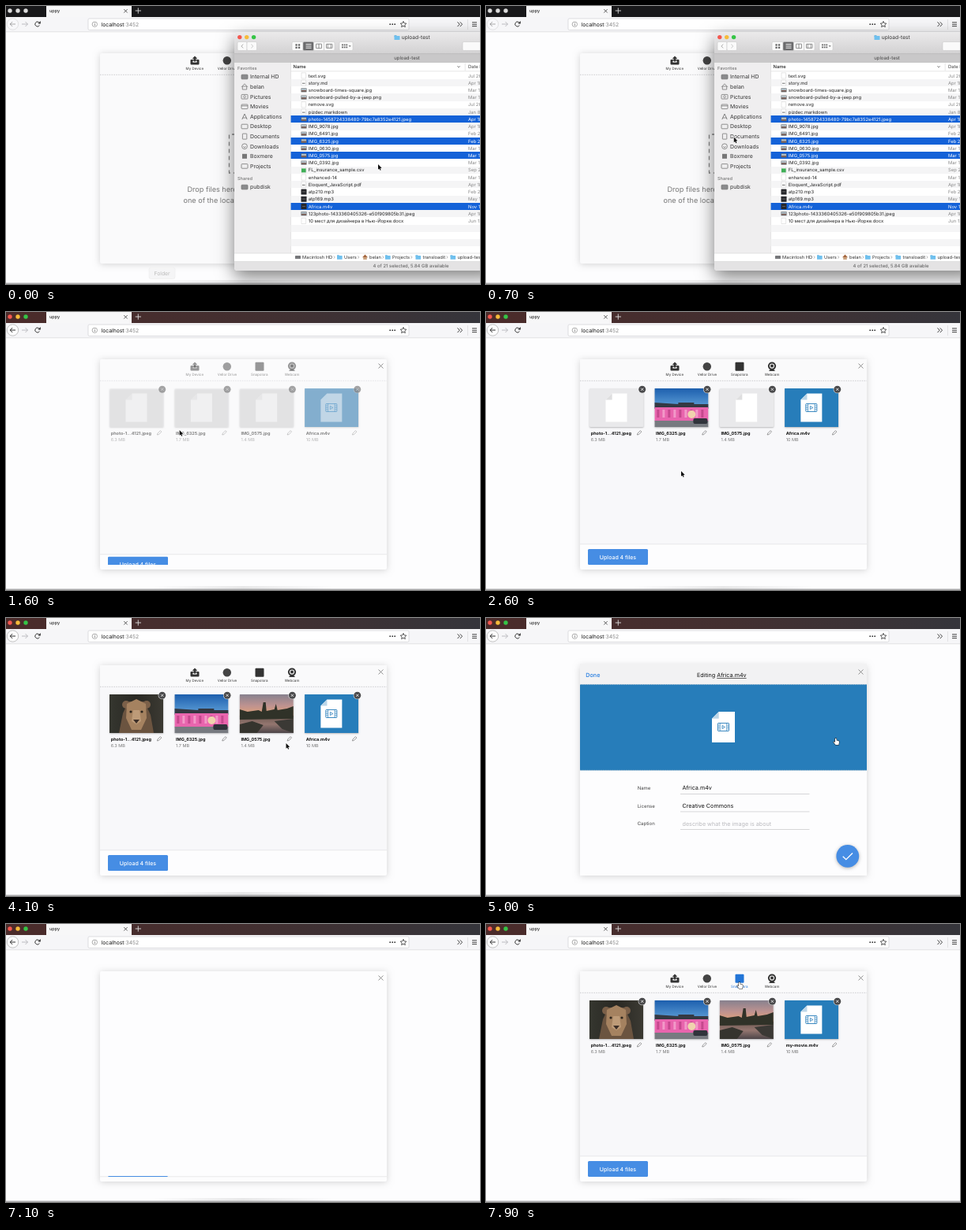
An HTML page with a canvas that plays this animation: 600x353 px, repeating every 8000 ms.

```html
<!DOCTYPE html>
<html lang="en">
<head>
<meta charset="utf-8">
<title>uppy</title>
<style>
html, body { margin: 0; width: 100%; height: 100%; overflow: hidden; background: #fdfdfe; }
canvas { display: block; width: 600px; height: 353px; }
</style>
</head>
<body>
<canvas id="stage"></canvas>
<script>
const W = 600, H = 353, LOOP = 8000, STEP = 100;
const BLUE = '#468de4', INK = '#222', TEAL = '#277dba';
const canvas = document.getElementById('stage');
const ratio = window.devicePixelRatio || 1;
canvas.width = W * ratio;
canvas.height = H * ratio;
const c = canvas.getContext('2d');
c.scale(ratio, ratio);
c.textRendering = 'geometricPrecision';

// Drawing helpers
function text(s, x, y, size, color = INK, weight = 400, align = 'left') {
  c.font = `${weight} ${size}px Inter, "Open Sans", sans-serif`;
  c.textAlign = align;
  c.textBaseline = 'alphabetic';
  c.fillStyle = color;
  c.fillText(s, x, y + size * 0.36);
  return c.measureText(s).width;
}
function rect(x, y, w, h, color) {
  c.fillStyle = color;
  c.fillRect(x, y, w, h);
}
function round(x, y, w, h, r, fill, stroke, lw = 0.6) {
  c.beginPath();
  c.roundRect(x, y, w, h, r);
  if (fill) { c.fillStyle = fill; c.fill(); }
  if (stroke) { c.strokeStyle = stroke; c.lineWidth = lw; c.stroke(); }
}
function disc(x, y, r, fill, stroke, lw = 0.8) {
  c.beginPath();
  c.arc(x, y, r, 0, 7);
  if (fill) { c.fillStyle = fill; c.fill(); }
  if (stroke) { c.strokeStyle = stroke; c.lineWidth = lw; c.stroke(); }
}
function path(pts, color, lw = 1, close) {
  c.beginPath();
  for (let i = 0; i < pts.length; i += 2) c.lineTo(pts[i], pts[i + 1]);
  if (close) c.closePath();
  c.strokeStyle = color;
  c.lineWidth = lw;
  c.stroke();
}
function poly(pts, fill) {
  c.beginPath();
  for (let i = 0; i < pts.length; i += 2) c.lineTo(pts[i], pts[i + 1]);
  c.closePath();
  c.fillStyle = fill;
  c.fill();
}
function cross(x, y, r, color, lw) {
  path([x - r, y - r, x + r, y + r], color, lw);
  path([x - r, y + r, x + r, y - r], color, lw);
}
function shade(x0, y0, x1, y1, ...colors) {
  const g = c.createLinearGradient(x0, y0, x1, y1);
  colors.forEach((col, i) => g.addColorStop(i / (colors.length - 1), col));
  return g;
}
function group(fn, { x = 0, y = 0, alpha = 1, clip, blur, shadow, drop = 1 } = {}) {
  c.save();
  if (clip) { c.beginPath(); c.rect(...clip); c.clip(); }
  c.translate(x, y);
  c.globalAlpha *= alpha;
  if (blur) { c.shadowBlur = blur * ratio; c.shadowColor = shadow; c.shadowOffsetY = drop * ratio; }
  fn();
  c.restore();
}
const clamp = v => Math.max(0, Math.min(1, v));
const ease = v => v * v * (3 - 2 * v);
const ramp = (t, a, b) => ease(clamp((t - a) / (b - a)));

// Browser
function browser(active) {
  rect(0, 0, W, H, '#fdfdfe');
  rect(0, 0, W, 14, active ? shade(0, 0, W, 0, '#4b2b2a', '#432f30', '#35353b') : '#18181a');
  const lights = active ? ['#f4574f', '#f6bb3a', '#35c546'] : ['#dcdcdc', '#dcdcdc', '#dcdcdc'];
  lights.forEach((col, i) => disc(5 + i * 10, 6, 2.7, col));
  rect(51, 0, 108, 14, '#f7f7f8');
  text('uppy', 55, 6.3, 5.6, '#111');
  cross(151.5, 6.3, 2.2, '#333', 0.8);
  path([163.7, 6, 171, 6], '#ddd', 0.9);
  path([167.3, 2.4, 167.3, 9.6], '#ddd', 0.9);

  rect(0, 14, W, 19, '#f6f6f8');
  rect(0, 32.5, W, 0.7, '#d9d9dc');
  group(() => {
    disc(8.5, 23, 7.2, '#fdfdfd', '#aaa', 0.7);
    path([12, 23, 5.2, 23], '#333', 1);
    path([8.2, 20, 5.2, 23, 8.2, 26], '#333', 1);
  }, { alpha: active ? 1 : 0.4 });
  path([20, 23, 27.5, 23], '#b5b5b8', 0.9);
  path([24.5, 20, 27.5, 23, 24.5, 26], '#b5b5b8', 0.9);
  c.beginPath();
  c.arc(39.8, 23, 3, 0.5, 5.5);
  c.strokeStyle = '#333'; c.lineWidth = 1; c.stroke();
  poly([43.8, 19, 43.8, 22.6, 40.3, 22.6], '#333');

  round(104, 16, 406, 14.5, 1.5, '#fff', '#c9c9cd');
  disc(112.3, 23.2, 3.2, null, '#777', 0.6);
  rect(112, 22.6, 0.7, 2.4, '#666');
  rect(112, 21.2, 0.7, 0.7, '#666');
  const w = text('localhost', 120.5, 23.2, 6.8, '#111');
  text(':3452', 120.5 + w, 23.2, 6.8, '#888');
  [486.2, 489.2, 492.2].forEach(x => disc(x, 23.2, 0.9, '#333'));
  const star = [];
  for (let i = 0; i < 10; i++) {
    const a = -Math.PI / 2 + i * Math.PI / 5, r = i % 2 ? 1.9 : 4;
    star.push(503 + r * Math.cos(a), 23.4 + r * Math.sin(a));
  }
  path(star, '#333', 0.8, true);
  [571.5, 574.8].forEach(x => path([x, 20.3, x + 2.7, 23.2, x, 26.1], '#333', 0.9));
  rect(584, 17, 0.6, 13, '#d5d5d8');
  [20.8, 23.2, 25.6].forEach(y => rect(590, y - 0.4, 6, 0.9, '#333'));

  rect(185, 348, 230, 4, shade(185, 0, 415, 0, '#0000', '#00000016', '#0000'));
  rect(0, 351.7, W, 0.9, '#77777a');
}

// Upload panel
function panel(fill) {
  group(() => round(119, 60, 363, 267, 2, fill), { blur: 9, shadow: 'rgba(0,0,0,.17)' });
}
function closeMark() { cross(474.5, 68.5, 3, '#777', 0.8); }

function sources(hover) {
  const label = (s, x, col = '#333') => text(s, x, 79.7, 4.5, col, 400, 'center');
  const dark = '#333';
  round(233.5, 68, 11, 6.6, 1, dark);
  rect(236.4, 69.4, 5.2, 2.2, '#f8f8f8');
  poly([239, 63.5, 242.3, 67, 240.2, 67, 240.2, 70.4, 237.8, 70.4, 237.8, 67, 235.7, 67], dark);
  label('My Device', 238.8);
  disc(279.8, 69.3, 5.2, '#444');
  label('Vellor Drive', 280);
  const pick = hover ? '#2275d7' : dark;
  round(315.5, 63.7, 11, 11, 1, pick);
  label('Snapolora', 320.8, pick);
  disc(362, 68.6, 5.1, dark);
  disc(362, 68.6, 3.1, '#f8f8f8');
  disc(362, 68.6, 2, dark);
  poly([358, 75, 360, 72.8, 364, 72.8, 366, 75], dark);
  label('Webcam', 362);
  c.setLineDash([1.6, 1.3]);
  path([119, 87.3, 482, 87.3], '#c4c4c7', 0.8);
  c.setLineDash([]);
}

function dropZone(over) {
  panel(over ? '#e3e3e5' : '#fafafb');
  sources(false);
  closeMark();
  const ink = over ? '#444' : '#777';
  c.setLineDash([5, 4]);
  path([318, 163, 282.5, 163, 282.5, 212, 318, 212], '#888', 1.3, true);
  c.setLineDash([]);
  text('Drop files here, paste or import', 229.5, 233.2, 9.1, ink);
  text('one of the locations above', 224.5, 246.3, 9.1, ink);
}

function sheet(x, y, w, h, film) {
  const f = w * 0.3;
  poly([x + f, y, x + w, y, x + w, y + h, x, y + h, x, y + f], '#fff');
  poly([x + f, y, x + f, y + f, x, y + f], film ? '#bcd6e8' : '#dededf');
  if (!film) return;
  const cx = x + w / 2, cy = y + h * 0.5;
  round(cx - 7, cy - 5, 14, 10, 0.6, null, TEAL, 0.9);
  path([cx - 4.3, cy - 5, cx - 4.3, cy + 5], TEAL, 0.7);
  path([cx + 4.3, cy - 5, cx + 4.3, cy + 5], TEAL, 0.7);
  for (const s of [-1, 1]) for (const d of [-2.4, 0, 2.4])
    path([cx + s * 4.3, cy + d, cx + s * 7, cy + d], TEAL, 0.6);
  path([cx - 1.5, cy - 2, cx + 2, cy, cx - 1.5, cy + 2], TEAL, 0.8, true);
}

// Simple stand-ins for the photos, each 68 by 49
const photos = [
  () => {
    rect(0, 0, 68, 49, shade(0, 0, 68, 0, '#35362f', '#292823', '#3c3a33'));
    poly([12, 49, 17, 24, 24, 9, 44, 9, 52, 26, 56, 49], '#6b5440');
    disc(21, 13, 5, '#7b6049');
    disc(47, 13, 5, '#7b6049');
    poly([22, 12, 34, 6, 46, 12, 47, 30, 40, 45, 28, 45, 21, 30], '#a58260');
    poly([30, 20, 38, 20, 40, 34, 34, 38, 28, 34], '#bd9b78');
    poly([30, 32, 38, 32, 34, 37], '#3d2f28');
    disc(27, 22, 1.6, '#2b241d');
    disc(41, 22, 1.6, '#2b241d');
  },
  () => {
    rect(0, 0, 68, 25, shade(0, 0, 0, 25, '#1d5fae', '#5fa0d8'));
    poly([0, 18, 30, 20, 30, 18, 50, 18, 50, 20, 68, 20, 68, 26, 0, 26], '#343842');
    rect(0, 24, 68, 18, '#e965ae');
    for (let i = 0; i < 9; i++) rect(3 + i * 7, 27, 3, 10, i % 2 ? '#f299c8' : '#c5488e');
    rect(0, 41, 68, 8, '#777a80');
    disc(47, 33, 5, '#f0d3ae');
    round(49, 38, 18, 7, 2, '#30333b');
  },
  () => {
    rect(0, 0, 68, 28, shade(0, 0, 0, 28, '#87818e', '#bd9290', '#e9a574'));
    rect(0, 27, 68, 22, shade(0, 27, 0, 49, '#6d5850', '#947670', '#4c4548'));
    poly([0, 19, 10, 22, 24, 20, 28, 22, 30, 10, 33, 10, 34, 21, 44, 19, 46, 12, 48, 20, 60, 18, 68, 15, 68, 31, 0, 32], '#303228');
    poly([0, 38, 16, 34, 30, 39, 22, 49, 0, 49], '#35342e');
    poly([44, 34, 68, 31, 68, 49, 54, 44], '#3b3935');
  },
  () => {
    rect(0, 0, 68, 49, TEAL);
    sheet(20.3, 6.5, 27, 36, true);
  }
];

function card(i, name, size, loaded) {
  const x = 131 + i * 82.35;
  group(() => round(x, 97, 68.5, 49, 1.5, '#e9e9eb'), { blur: 2, shadow: 'rgba(0,0,0,.25)' });
  if (loaded) group(photos[i], { x, y: 97, clip: [x, 97, 68.5, 49] });
  else sheet(x + 20.5, 103.5, 27, 36);
  disc(x + 66.7, 98.3, 5, '#fff');
  disc(x + 66.7, 98.3, 4.5, '#4a4a4c');
  cross(x + 66.7, 98.3, 1.6, '#fff', 0.8);
  text(name, x + 1.7, 154, 5.5, '#111', 700);
  text(size, x + 1.7, 162.2, 5.5, '#777');
  path([x + 60.4, 156, x + 61, 154, x + 64.4, 150.6, x + 65.9, 152.1, x + 62.4, 155.5], '#777', 0.7, true);
}

function files(t, start, movie, loaded) {
  const k = ramp(t, start, start + 400);
  const top = 320.5 - 26 * k;
  panel('#fdfdfe');
  group(() => {
    rect(119, 87, 363, top - 87, '#f8f8fa');
    rect(119, 60, 363, 27, '#fafafb');
    sources(t >= 7700);
    card(0, 'photo-1...4121.jpeg', '6.3 MB', loaded[0]);
    card(1, 'IMG_6325.jpg', '1.7 MB', loaded[1]);
    card(2, 'IMG_0575.jpg', '1.4 MB', loaded[2]);
    card(3, movie, '10 MB', true);
  }, { alpha: k });
  rect(119, top, 363, 0.7, '#dfdfe2');
  const bt = 320 - 19 * k;
  group(() => {
    round(129, 301, 76, 20, 1.5, BLUE);
    text('Upload 4 files', 167, 311.2, 7, '#fff', 500, 'center');
  }, { y: bt - 301, clip: [119, bt, 363, 321 - bt] });
  closeMark();
}

// File details
const typed = [5800, 6000, 6100, 6200, 6300, 6500, 6700, 6800];
function editor(t) {
  const k = ramp(t, 4700, 5000);
  const count = typed.filter(s => t >= s).length;
  const stem = t < 5700 ? 'Africa' : 'my-movie'.slice(0, count);
  group(() => {
    rect(119, 58, 363, 269, '#fdfdfe');
    rect(119, 58, 363, 26.5, '#f2f2f3');
    text('Done', 126.3, 72.4, 7.2, '#1f7ae0', 500);
    const a = text('Editing ', 267, 72.3, 7.2, '#111');
    const b = text('Africa.m4v', 267 + a, 72.3, 7.2, '#111');
    rect(267 + a, 76.2, b, 0.7, '#222');
    rect(119, 84.3, 363, 109.2, TEAL);
    c.setLineDash([1.6, 1.3]);
    path([119, 84.4, 482, 84.4], '#b9c6cf', 0.7);
    path([119, 193.4, 482, 193.4], '#b9c6cf', 0.7);
    c.setLineDash([]);
    sheet(286, 119, 29, 39, true);
    ['Name', 'License', 'Caption'].forEach((s, i) => {
      text(s, 191.7, 216 + i * 22.6, 6, '#444');
      rect(246, 223 + i * 22.6, 163.5, 0.7, '#c5c5c8');
    });
    c.font = '400 7.2px Inter, "Open Sans", sans-serif';
    const w = c.measureText(stem).width;
    if (t === 5600) rect(248.5, 211.5, w, 9.5, '#b3d7ff');
    text(stem + '.m4v', 248.5, 215.9, 7.2, '#111');
    if (t >= 5700) rect(248.7 + w, 211.8, 0.7, 8.6, '#222');
    text('Creative Commons', 248.5, 238.5, 7.2, '#111');
    text('describe what the image is about', 248.5, 261.2, 7.2, '#b9b9bd');
    group(() => disc(457.8, 302.4, 14.4, BLUE), { blur: 4, shadow: 'rgba(0,0,0,.3)' });
    path([451.7, 302.8, 455.8, 306.7, 464, 298.5], '#fff', 1.3);
  }, { y: -269 * (1 - k), clip: [119, 57.5, 363, 270] });
  closeMark();
}

// File window
const rows = `text.svg|Jul 26
story.md|Apr 18
snowboard-times-square.jpg|Mar 18
snowboard-pulled-by-a-jeep.png|Mar 18
remove.svg|Jul 26
pizdec.markdown|Jan 8,
photo-1458724338480-79bc7a8352e4121.jpeg|Apr 18
IMG_9078.jpg|Apr 18
IMG_6491.jpg|Feb 2
IMG_6325.jpg|Feb 2
IMG_0630.jpg|Mar 18
IMG_0575.jpg|Mar 18
IMG_0392.jpg|Mar 18
FL_insurance_sample.csv|Sep 2
enhanced-14|Mar 18
Eloquent_JavaScript.pdf|Apr 18
atp210.mp3|Feb 2
atp169.mp3|May 1
Africa.m4v|Nov 1
123photo-1433360405326-e50f909805b31.jpeg|Apr 18
10 мест для дизайнера в Нью-Йорке.docx|Jun 13`.split('\n').map(r => r.split('|'));
const picked = [6, 9, 11, 18];

function folder(x, y, s = 1) {
  rect(x, y - 2.8 * s, 3 * s, 2 * s, '#5aaee0');
  round(x, y - 2 * s, 7 * s, 5 * s, 0.5, '#6fc0ee');
}
function fileIcon(name, y) {
  if (/jp|png/.test(name)) {
    rect(373.5, y - 2.5, 7, 5, '#5d6468');
    rect(374, y - 2, 6, 2, '#b5c3cb');
    rect(374, y + 0.3, 6, 1.2, '#8d6458');
  } else if (/mp3|m4v/.test(name)) {
    round(373.5, y - 3.6, 7, 7.2, 0.6, '#26272b');
    rect(375, y - 0.5, 4, 0.7, '#777');
  } else {
    rect(374, y - 3.6, 5.6, 7.2, '#fff');
    path([374, y - 3.6, 379.6, y - 3.6, 379.6, y + 3.6, 374, y + 3.6], '#ccc', 0.5, true);
    if (/csv/.test(name)) rect(374, y - 2, 5.6, 5, '#3fae56');
    else if (/md|mark|pdf/.test(name)) rect(375, y, 3.6, 1.2, '#888');
  }
}

function fileWindow() {
  group(() => round(289, 33.5, 330, 302.5, 4, '#fff'),
    { blur: 22, shadow: 'rgba(0,0,0,.5)', drop: 8 });
  round(289, 33.5, 330, 38, [4, 0, 0, 0], shade(0, 33, 0, 61, '#ebeaeb', '#d2d1d2'));
  ['#f4574f', '#f6bb3a', '#35c546'].forEach((col, i) => disc(295.8 + i * 8.9, 39.6, 2.7, col));
  folder(491.5, 40);
  text('upload-test', 500.8, 39.8, 6.6, '#333');
  const button = (x, w, fill = '#fafafa') => round(x, 45.5, w, 11, 1.5, fill, '#c2c2c2', 0.5);
  button(293, 12); button(305, 12.5);
  path([300.3, 48.6, 297.8, 51, 300.3, 53.4], '#999', 0.8);
  path([310.3, 48.6, 312.8, 51, 310.3, 53.4], '#bbb', 0.8);
  button(362, 14); button(376, 13.5, '#6b6b6d'); button(389.5, 13); button(402.5, 13.5);
  for (const x of [366.4, 369.9]) for (const y of [48.3, 51.7]) rect(x, y, 2.3, 2.3, '#666');
  [48.2, 50.5, 52.8].forEach(y => rect(379.5, y, 7, 0.9, '#fff'));
  round(392.5, 48.2, 7, 5.5, 0.3, null, '#666', 0.7);
  path([396, 48.2, 396, 53.7], '#666', 0.7);
  round(405.5, 48.4, 7.5, 5, 0.3, null, '#666', 0.7);
  path([407.4, 48.4, 407.4, 53.4], '#666', 0.6);
  path([411.1, 48.4, 411.1, 53.4], '#666', 0.6);
  button(422, 17);
  for (const x of [425, 427.7, 430.4]) for (const y of [48.5, 51.5]) rect(x, y, 1.8, 1.8, '#666');
  poly([433.7, 50.2, 436.7, 50.2, 435.2, 52], '#666');
  button(578, 30);

  rect(289, 60.5, 311, 11, '#c9c8c9');
  rect(289, 60.5, 311, 0.6, '#b3b3b3');
  text('upload-test', 507.5, 66, 6, '#444', 400, 'center');
  rect(289, 71.5, 71, 242.5, '#efeeef');
  rect(360, 71.5, 0.6, 242.5, '#d2d2d2');
  rect(289, 71.3, 311, 0.6, '#bbb');

  text('Favorites', 293, 79, 5.6, '#777', 500);
  const places = ['Internal HD', 'belan', 'Pictures', 'Movies', 'Applications', 'Desktop',
    'Documents', 'Downloads', 'Boxmere', 'Projects', 'pubdisk'];
  places.forEach((s, i) => {
    const y = i < 10 ? 90 + i * 12.6 : 230;
    if (i === 1) {
      path([298, 102.8, 302, 98.8, 306, 102.8], '#777', 0.8);
      round(299.3, 102, 5.4, 4, 0, null, '#777', 0.8);
    } else if (i === 4) {
      path([298.8, 144, 302, 137, 305.2, 144], '#777', 0.9);
      path([299.5, 142, 304.7, 142], '#777', 0.8);
    } else if (i === 7) {
      disc(302, y, 3.4, null, '#777');
      path([300.4, y, 302, y + 1.8, 303.6, y], '#777', 0.8);
    } else if (i === 8) rect(299, y - 3, 6, 6, '#777');
    else if (i === 6) round(299.4, y - 3.5, 5.4, 7, 0.4, null, '#777', 0.8);
    else {
      round(298, y - 2.8, 8, 5.6, 0.8, i === 0 || i === 10 ? '#8a8a8c' : null, '#777', 0.8);
      if (i === 2) disc(302, y, 1.4, null, '#777', 0.7);
      if (i === 3) path([298, y - 1, 306, y - 1], '#777', 0.8);
    }
    text(s, 309, y, 6.9, '#333');
  });
  text('Shared', 293, 218.5, 5.6, '#777', 500);

  text('Name', 363.5, 77.2, 5.8, '#222', 500);
  path([571.3, 76.3, 573, 78, 574.7, 76.3], '#666', 0.8);
  rect(580.8, 72.5, 0.6, 9.5, '#d5d5d5');
  text('Date Modified', 585, 77.2, 5.8, '#444');
  rect(360.5, 82.6, 240, 0.6, '#d5d5d5');
  for (let i = 0; i < 25; i++) {
    const y = 88.4 + i * 9.225, on = picked.includes(i);
    if (on || i % 2) {
      const top = Math.round(y - 4.6);
      rect(360.6, top, 240, Math.round(y + 4.6) - top, on ? '#1462d8' : '#f5f5f6');
    }
    if (!rows[i]) continue;
    const [name, date] = rows[i];
    fileIcon(name, y);
    text(name, 382.8, y, 5.85, on ? '#fff' : '#222');
    text(date, 585, y, 5.85, on ? '#fff' : '#888');
  }

  rect(289, 314, 311, 10, '#fff');
  rect(289, 313.7, 311, 0.6, '#d5d5d5');
  const trail = [['Macintosh HD', 366], ['Users', 419], ['belan', 451], ['Projects', 480],
    ['transloadit', 518.5], ['upload-test', 562.5]];
  trail.forEach(([s, x], i) => {
    if (i === 0) round(x, 317, 7, 4, 0.6, '#77787b');
    else if (i === 2) {
      poly([x, 319.3, x + 3.5, 315.6, x + 7, 319.3], '#a5673f');
      rect(x + 1.2, 319, 4.6, 3, '#caa27e');
    } else folder(x, 319, 0.95);
    const w = text(s, x + 9, 319, 5.75, '#333');
    if (i < 5) path([x + w + 10.6, 317.3, x + w + 12, 319, x + w + 10.6, 320.7], '#888', 0.6);
  });
  rect(289, 324, 311, 0.6, '#c5c5c5');
  round(289, 324.4, 330, 11.6, [0, 0, 0, 4], '#e4e3e4');
  text('4 of 21 selected, 5.84 GB available', 512.5, 330.2, 5.9, '#555', 400, 'center');
}

// Pointer: time, x, y
const track = [[0, 471, 201], [300, 410, 187], [1100, 217.5, 146], [1500, 218, 147], [2200, 247, 202],
  [3400, 247, 202], [3700, 302, 178], [3900, 310, 174], [4100, 354.5, 159], [4600, 441, 150],
  [5000, 442, 153], [5500, 268, 213], [7200, 296, 170], [7700, 320, 74], [8000, 320, 74]];

function pointer(t) {
  if (t >= 5700 && t < 7300) return;
  let i = 0;
  while (t >= track[i + 1][0]) i++;
  const [t0, x0, y0] = track[i], [t1, x1, y1] = track[i + 1];
  const k = ease((t - t0) / (t1 - t0));
  const x = x0 + (x1 - x0) * k, y = y0 + (y1 - y0) * k;
  const hand = (t >= 4600 && t <= 5100) || t >= 7700;
  const beam = t >= 5400 && t < 5700;
  group(() => {
    if (beam) {
      path([-1.5, -3, 0, -2.3, 1.5, -3], '#222', 0.7);
      path([0, -2.5, 0, 4.5], '#222', 0.7);
      path([-1.5, 5, 0, 4.3, 1.5, 5], '#222', 0.7);
      return;
    }
    const shape = hand
      ? [0, 0, 1.4, 0, 1.7, 2.6, 4.6, 3.2, 5, 4.4, 4.4, 8, 0.6, 8, -2, 4.8, -1.2, 4, 0, 5]
      : [0, 0, 0, 6.7, 1.5, 5.4, 2.6, 7.8, 3.7, 7.3, 2.7, 5, 4.7, 4.8];
    path(shape, hand ? '#222' : '#fff', hand ? 1.1 : 1.2, true);
    poly(shape, hand ? '#fff' : '#111');
  }, { x, y });
}

function draw(t) {
  const dropped = t >= 1400;
  browser(dropped);
  if (!dropped) {
    dropZone(t >= 800);
    group(() => {
      round(181, 332, 33, 14.5, 2.5, '#f5f5f6', '#e8e8e8', 0.5);
      text('Folder', 197.5, 339.2, 6.8, '#bbb', 400, 'center');
    }, { alpha: 1 - ramp(t, 0, 300) });
    fileWindow();
  } else if (t < 7100) {
    files(t, 1400, 'Africa.m4v', [t >= 3200, t >= 2200, t >= 2900]);
    if (t > 4700) editor(t);
  } else {
    files(t, 7100, 'my-movie.m4v', [true, true, true]);
  }
  pointer(t);
}

function tick() {
  const t = performance.now() % LOOP;
  draw(Math.floor(t / STEP) * STEP);
  requestAnimationFrame(tick);
}
tick();
</script>
</body>
</html>
```
